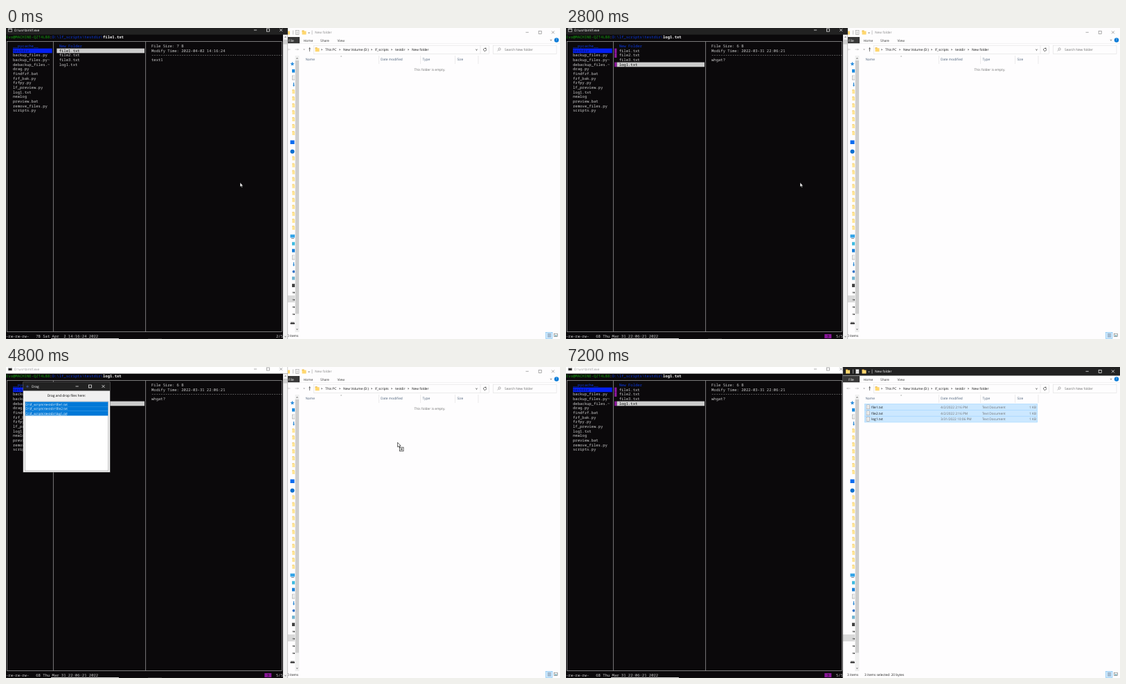
These frames come from a looping animation (800x450 px, 7.3 s). An HTML page with a canvas:

```html
<!DOCTYPE html>
<html lang="en">
<head>
<meta charset="utf-8">
<title>Drag files from a terminal</title>
<style>
html, body { margin: 0; width: 100%; height: 100%; overflow: hidden; background: #fff; }
canvas { display: block; }
</style>
</head>
<body>
<canvas id="stage" width="800" height="450"></canvas>
<script>
const c = document.getElementById('stage').getContext('2d');
c.textRendering = 'geometricPrecision';

const LOOP = 7300;
const CW = 10 / 3, RH = 20 / 3, TOP = 9.6;  // terminal cell and height of its title bar
const MONO = '5.555px "Noto Sans Mono", "DejaVu Sans Mono", monospace';
const UI = '4.8px "Open Sans", "Noto Sans", sans-serif';
const BLUE = '#0a37da', PURPLE = '#881798', ACCENT = '#0078d7', TITLE = '#222', PAPER = '#fefdfe';
const DIR = 'D:\\lf_scripts\\testdir\\';

const parentList = ['__pycache__', 'testdir', 'backup_files.py', 'backup_files.py~', 'debackup_files.~',
  'drag.py', 'findfzf.bat', 'fzf_bak.py', 'fzfpy.py', 'lf_preview.py', 'log1.txt', 'newlog',
  'preview.bat', 'remove_files.py', 'scripts.py'];
const files = [
  { name: 'file1.txt', size: 7, day: '2022-04-02', date: 'Sat Apr  2', time: '14:16:24', body: 'text1', shown: '4/2/2022 2:16 PM' },
  { name: 'file2.txt', size: 7, day: '2022-04-02', date: 'Sat Apr  2', time: '14:16:28', body: 'text2', shown: '4/2/2022 2:16 PM' },
  { name: 'file3.txt', size: 7, day: '2022-04-02', date: 'Sat Apr  2', time: '14:16:32', body: 'text3' },
  { name: 'log1.txt', size: 6, day: '2022-03-31', date: 'Thu Mar 31', time: '22:06:21', body: 'whgat?', shown: '3/31/2022 10:06 PM' }
];
const marks = [[0, 500], [1, 1000], [3, 1800]];  // file, time it is marked
const picked = marks.map(m => files[m[0]]);

// time, x, y of the pointer tip
const path = [[0, 338, 223.5], [3800, 338, 223.5], [4450, 62, 60], [4600, 70, 62], [4800, 565.5, 109],
  [5300, 556, 205], [5600, 554, 222], [5750, 554, 222], [6100, 540, 452], [LOOP, 540, 452]];

function box(x, y, w, h, fill) { c.fillStyle = fill; c.fillRect(x, y, w, h); }
function frame(x, y, w, h, color, lw = .5) { c.strokeStyle = color; c.lineWidth = lw; c.strokeRect(x, y, w, h); }
function line(color, lw, ...p) {
  c.strokeStyle = color; c.lineWidth = lw;
  c.beginPath();
  for (let i = 0; i < p.length; i += 2) c.lineTo(p[i], p[i + 1]);
  c.stroke();
}
function dot(x, y, r, fill) { c.fillStyle = fill; c.beginPath(); c.arc(x, y, r, 0, 7); c.fill(); }
function text(s, x, y, fill = '#000', align = 'left') {
  c.font = UI; c.fillStyle = fill; c.textAlign = align;
  c.fillText(s, x, y + 1.7);
}
function cell(s, col, row, fill = '#ccc', bold = '') {
  c.font = bold + MONO; c.fillStyle = fill; c.textAlign = 'left';
  c.fillText(s, col * CW, TOP + 5.2 + row * RH);
}
function cells(col, row, n, fill) { box(col * CW, TOP + row * RH, n * CW, RH, fill); }
function chevron(x, y, dx, dy, color = '#555') {
  line(color, .6, x - dx - dy, y - dy - dx, x + dx, y + dy, x - dx + dy, y - dy + dx);
}
function folder(x, y, edge = '#e8b23c', fill = '#ffd76e') {
  box(x - 3, y - 3, 3, 2, edge);
  box(x - 3, y - 2, 6, 5, fill);
}
function page(x, y) {
  box(x - 2, y - 3, 4.5, 6, '#fff'); frame(x - 2, y - 3, 4.5, 6, '#8a8a8a');
  for (let i = -1; i < 3; i++) line('#aaa', .4, x - 1, y + i * 1.2, x + 1.6, y + i * 1.2);
}
function buttons(x, y, gap, color) {
  line(color, .7, x - 2, y, x + 2.2, y);
  frame(x + gap - 2, y - 2, 4, 4, color, .7);
  const k = x + gap * 2;
  line(color, .7, k - 2, y - 2, k + 2, y + 2);
  line(color, .7, k - 2, y + 2, k + 2, y - 2);
}
function clip(x, y, w, h, draw) {
  c.save(); c.beginPath(); c.rect(x, y, w, h); c.clip(); draw(); c.restore();
}

function terminal(t) {
  const active = t < 3000;
  const sel = t < 500 ? 0 : t < 1000 ? 1 : t < 1200 ? 2 : 3;
  const f = files[sel], marked = marks.filter(m => t >= m[1]);
  box(0, 0, 407, 450, '#0b090b');
  box(0, 0, 407, TOP, active ? TITLE : '#fff');
  box(3, .8, 6, 4.6, active ? '#ddd' : '#bbb');
  box(3.6, 2, 4.8, 2.8, '#222');
  text('D:\\usr\\bin\\lf.exe', 12, 3, active ? '#fff' : '#999');
  buttons(360, 3, 18.6, active ? '#fff' : '#888');

  cell('Ivo@MACHINE-QZT4LB8', 0, 0, '#13a10e');
  cell(':', 19, 0);
  cell(DIR, 20, 0, BLUE);
  cell(f.name, 42, 0, '#f2f2f2', 'bold ');

  const top = TOP + RH * 1.5, bottom = TOP + RH * 64.5;
  frame(1.6, top, 396.9, bottom - top, '#aaa', .7);
  for (const x of [68.4, 201.6]) line('#aaa', .7, x, top, x, bottom);

  cells(3, 3, 17, '#0420f0');
  parentList.forEach((s, i) => cell(s, 3, i + 2, i == 0 ? BLUE : i == 1 ? '#08105a' : '#ccc'));

  cell('New Folder', 23, 2, BLUE);
  cells(22, sel + 3, 38, '#ccc');
  for (const [i] of marked) cells(21, i + 3, 1, PURPLE);
  files.forEach((g, i) => cell(g.name, 23, i + 3, i == sel ? '#0c0c0c' : '#ccc'));

  cell(`File Size: ${f.size} B`, 63, 2);
  cell(`Modify Time: ${f.day} ${f.time}`, 63, 3);
  cell('-'.repeat(57), 63, 4);
  cell(f.body, 63, 5);

  cell(`-rw-rw-rw-   ${f.size}B ${f.date} ${f.time} 2022`, 0, 65);
  if (marked.length) {
    cells(112, 65, 3, PURPLE);
    cell(String(marked.length), 113, 65, '#0c0c0c');
  }
  cell(`${sel + 2}/5`, 117, 65);

  // scrollbar
  box(400, TOP, 7, 450, '#f0f0f0');
  box(400.5, 17, 6, 6.5, '#cdcdcd');
  chevron(403.5, 13.2, 0, -.8);
  chevron(403.5, 446.5, 0, .8);
  box(406.7, 0, .5, 450, '#777');

  // screen edge
  box(0, 449, 400, 1, '#111');
  box(65, 449, 98, 1, '#ddd');
  if (t < 7200) box(205, 449, 20, 1, '#333');
}

function navIcons() {
  const root = 413.5, child = 415.5;
  const screen = (y, fill) => box(child - 2.5, y - 2.3, 6, 4.8, fill);
  const down = y => {
    line('#2080d0', 1.1, child, y - 3, child, y + 2);
    chevron(child, y + 1.4, 0, 1.1, '#2080d0');
  };
  const paleFolder = y => folder(child + .8, y, '#f3d27c', '#ffe596');

  c.fillStyle = '#2f8fdd';
  c.beginPath();
  for (let i = 0; i < 10; i++) {
    const a = i * Math.PI / 5 - Math.PI / 2, r = i % 2 ? 1.4 : 3.2;
    c.lineTo(root + r * Math.cos(a), 52 + r * Math.sin(a));
  }
  c.fill();
  screen(62, '#1c8be0');
  page(child, 72);
  down(82);
  for (let y = 92; y < 160; y += 10) paleFolder(y);
  box(root - 3, 162.5, 6, 5.5, '#0a6cf0');
  dot(root, 178.7, 3, '#0a6fd0');
  for (let y = 188.5; y < 292; y += 10.05) paleFolder(y);

  box(root - 3, 298.8, 6.5, 4.6, '#35a5e8'); box(root - 1.5, 304, 4, .7, '#667');
  screen(312, '#40bce0');
  screen(322, '#1c80d8');
  page(child, 332);
  down(342);
  dot(child, 352.5, 2, '#3a78c8');
  screen(362, '#73b3d0');
  screen(372.5, '#444');
  for (const y of [382.5, 393, 403.5, 414]) { box(child - 2, y - .8, 6, 2, '#999'); box(child, y, 1.4, 1, '#222'); }
  box(root - 2.5, 425.5, 5.5, 3, '#777'); box(root - 3, 427, 6.5, 1.2, '#222');
}

function navPane() {
  box(400, 387, 17.4, 10, '#d9d9d9');
  clip(400, 40, 17.2, 400, navIcons);
  box(417.4, 40, 6, 400, '#f0f0f0');
  box(417.8, 47, 5.2, 366.5, '#cdcdcd');
  chevron(420.4, 44, 0, -.9);
  chevron(420.4, 436, 0, .9);
}

function explorer(done) {
  const ink = done ? '#fff' : '#888';
  box(400, 0, 400, 450, PAPER);
  box(400, 0, 400, 12.5, done ? TITLE : PAPER);
  folder(407, 6.5);
  line(ink, .5, 414.5, 3.5, 414.5, 9.5);
  page(420.5, 6.5);
  folder(430.5, 6.5);
  chevron(437.5, 7, 0, .7, done ? '#fff' : '#333');
  line(ink, .5, 442, 3.5, 442, 9.5);
  text('New folder', 446, 6.5, ink);
  buttons(752.5, 6.3, 18.7, ink);

  box(400, 13, 24, 9.3, '#383838');
  text('File', 408, 17.8, '#fff');
  text('Home', 429.5, 17.8, '#333');
  text('Share', 454, 17.8, '#333');
  text('View', 478.5, 17.8, '#333');
  chevron(787, 17.5, 0, .9);
  dot(795, 17.5, 3.2, ACCENT);
  text('?', 795, 17.5, '#fff', 'center');
  line('#e5e5e5', .5, 400, 22.5, 800, 22.5);

  line('#bbb', .7, 405.5, 31, 410.5, 31); chevron(406.5, 31, -1, 0, '#bbb');
  line('#bbb', .7, 417.5, 31, 422.5, 31); chevron(421.5, 31, 1, 0, '#bbb');
  chevron(430.5, 31, 0, .7, '#777');
  line('#444', .7, 438.5, 28.5, 438.5, 34); chevron(438.5, 29.5, 0, -1, '#444');
  frame(444.5, 25.2, 253, 12.2, '#d9d9d9');
  line('#d9d9d9', .5, 685, 25.2, 685, 37.4);
  folder(449.5, 31.2);
  [['This PC', 461], ['New Volume (D:)', 487], ['lf_scripts', 533], ['testdir', 562], ['New folder', 586]].forEach(([s, x]) => {
    chevron(x - 5, 31.3, .8, 0, '#333');
    text(s, x, 31.2, '#111');
  });
  chevron(679.5, 31.5, 0, 1, '#333');
  c.strokeStyle = '#333'; c.lineWidth = .7;
  c.beginPath(); c.arc(691.5, 31.4, 2, -.5, 5); c.stroke();
  box(692, 28.8, 1.4, 1.2, '#333');
  frame(703.5, 25.2, 91.5, 12.2, '#d9d9d9');
  c.strokeStyle = '#777'; c.lineWidth = .6;
  c.beginPath(); c.arc(712.6, 30.5, 1.6, 0, 7); c.stroke();
  line('#777', .6, 711.4, 31.8, 709.8, 33.4);
  text('Search New folder', 720, 31.2, '#6d6d6d');

  navPane();
  chevron(484, 41, 0, -.6, '#888');
  [['Name', 432.5], ['Date modified', 541], ['Type', 601.5], ['Size', 651.5]].forEach(([s, x]) => text(s, x, 45.7, '#4c607a'));
  for (const x of [538.5, 598.5, 648.5, 682]) line('#e0e0e0', .6, x, 40, x, 52);

  if (done) {
    picked.forEach((f, i) => {
      const y = 53.3 + i * 8.9, m = y + 4.6;
      box(431, y, 250, 8.9, '#cce8ff');
      frame(431.3, y + .2, 249.4, 8.7, '#99d1ff');
      page(436, m);
      text(f.name, 441, m, '#111');
      text(f.shown, 541, m, '#6d6d6d');
      text('Text Document', 601, m, '#6d6d6d');
      text('1 KB', 679, m, '#6d6d6d', 'right');
    });
    text('3 items selected  20 bytes', 431, 445, '#222');
  } else {
    text('This folder is empty.', 612, 60.5, '#6d6d6d', 'center');
  }
  text(done ? '3 items' : '0 items', 406, 445, '#222');

  box(779.5, 440.3, 9.5, 9, '#cce8ff');
  frame(779.5, 440.3, 9.5, 9, '#66b5ee');
  for (let i = 0; i < 3; i++) line('#456', .6, 782, 442.8 + i * 2, 787, 442.8 + i * 2);
  frame(791.5, 442.5, 5, 4, '#555');
  box(792.5, 444.5, 3, 1.5, '#6ab');
}

function dragWindow(t) {
  box(24.5, 21.5, 126, 131, '#777');
  box(25, 22, 125, 130, '#f0f0f0');
  box(25, 22, 125, 12.4, TITLE);
  dot(31, 28.2, 1.6, '#3b4a78');
  text('Drag', 37, 28.2, '#fff');
  buttons(102.5, 28, 19, '#fff');
  text('Drag and drop files here:', 87.3, 41.2, '#000', 'center');
  box(27.3, 50, 120.5, 100, '#fff');
  frame(27.3, 50, 120.5, 100, '#888');
  const count = Math.max(0, Math.min(3, Math.floor((t - 3300) / 100)));
  picked.forEach((f, i) => {
    const y = 50.5 + i * 6.65, on = i < count;
    if (on) box(27.8, y, 119.5, 6.65, ACCENT);
    text(DIR + f.name, 28.2, y + 3.4, on ? '#fff' : '#000');
    if (on && i == count - 1) line('#fff', .4, 28.2, y + 5.8, 88, y + 5.8);
  });
}

function pointer(t) {
  const i = path.findIndex(p => p[0] > t);
  const [t0, x0, y0] = path[i - 1], [t1, x1, y1] = path[i];
  const k = (t - t0) / (t1 - t0);
  c.save();
  c.translate(x0 + (x1 - x0) * k, y0 + (y1 - y0) * k);
  c.beginPath();
  for (const [x, y] of [[0, 0], [0, 6.6], [1.5, 5.3], [2.5, 7.5], [3.5, 7], [2.6, 4.9], [4.6, 4.9]]) c.lineTo(x, y);
  c.closePath();
  c.fillStyle = '#fff'; c.fill();
  c.strokeStyle = '#000'; c.lineWidth = .6; c.stroke();
  if (t >= 4700 && t < 5400) {
    box(3, 7, 5.5, 5.5, '#fff');
    frame(3, 7, 5.5, 5.5, '#222', .7);
    line('#222', .8, 4.2, 9.75, 7.3, 9.75);
    line('#222', .8, 5.75, 8.2, 5.75, 11.3);
  }
  c.restore();
}

function draw(now) {
  const t = now % LOOP;
  if (t >= 5400) {
    terminal(t);
    explorer(true);
    box(399.5, 0, .5, 450, '#999');
  } else {
    explorer(false);
    clip(0, 0, 407.2, 450, () => terminal(t));
    if (t >= 3000) dragWindow(t);
  }
  pointer(t);
  requestAnimationFrame(() => draw(performance.now() - start));
}
const start = performance.now();
draw(0);
</script>
</body>
</html>
```
